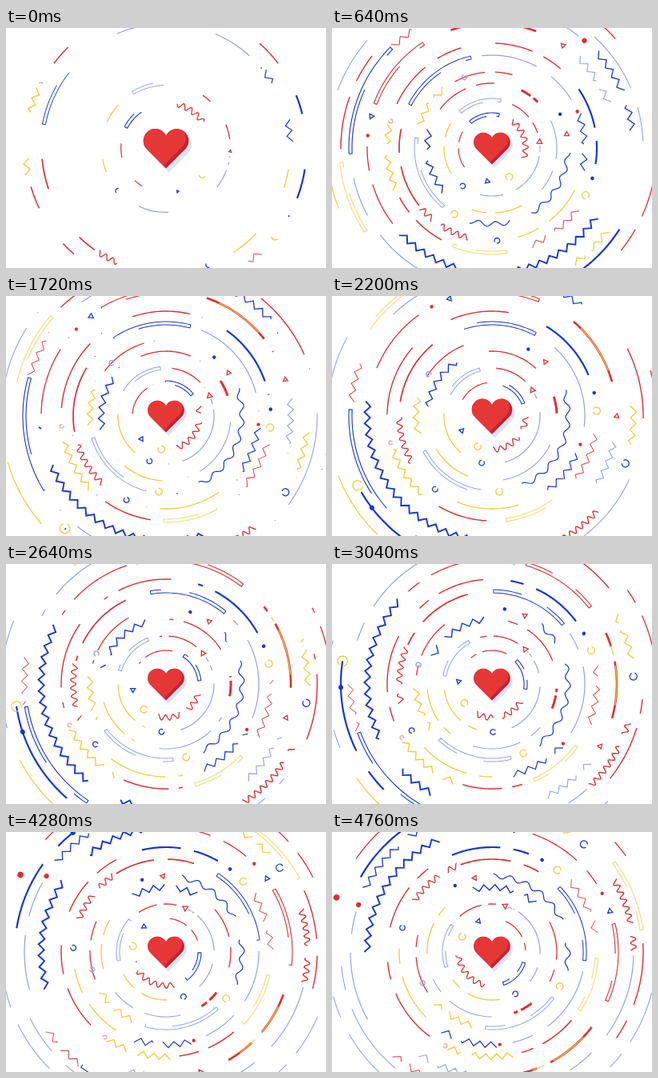
An HTML page with a canvas that plays this animation: 400 by 300 pixels, repeating every 4800 ms.

```html
<!DOCTYPE html>
<html lang="en">
<head>
<meta charset="utf-8">
<title>Heart confetti</title>
<style>
  html, body { margin: 0; width: 100%; height: 100%; overflow: hidden; background: #fff; }
  canvas { display: block; width: 400px; height: 300px; }
</style>
</head>
<body>
<canvas id="stage"></canvas>
<script>
const LOOP = 4800;
const RED = '#dc2f33', BLUE = '#1637d4', SKY = '#8fa1ee', GOLD = '#f3c93b', PINK = '#f0a3a5', CREAM = '#f6dc80';
const rad = d => d * Math.PI / 180;
const mod1 = x => x - Math.floor(x);
const clamp = x => Math.max(0, Math.min(1, x));

const canvas = document.getElementById('stage');
const ctx = canvas.getContext('2d');
const dpr = window.devicePixelRatio || 1;
canvas.width = 400 * dpr;
canvas.height = 300 * dpr;

const rings = [];
// r: radius, speed: degrees per second, late: hidden at the start of the loop
function ring(r, speed, late, paths, marks) {
  rings.push({ r, speed, late, paths, marks });
}

// paths: [kind, colour, from, to, width, gap phase]; marks: [kind, colour, angle, size]
ring(42, 36, false, [
  ['box', BLUE, -153, -101, 1.1],
  ['squiggle', RED, -78, 9, 1.3, .31],
  ['arc', RED, 122, 186, 1.2]
], [['tri', BLUE, 75, 3.4], ['ring', GOLD, 36, 4.3]]);

ring(60, -16.2, false, [
  ['box', SKY, -121, -69, 1],
  ['arc', GOLD, 158, 222, 1.3],
  ['arc', RED, -55, -8, 1.3],
  ['arc', SKY, 20, 115, 1.2],
  ['arc', SKY, 7, 15, 1.2]
], [['tri', RED, 3, 3.8], ['ring', BLUE, 138, 3.3]]);

ring(81, 28, true, [
  ['arc', RED, -81, -63, 3],
  ['arc', RED, -161, -106, 1.3],
  ['arc', GOLD, 45, 90, 1.3],
  ['arc', SKY, -43, 22, 1.1],
  ['zig', BLUE, 120, 178, 1.4]
], []);

ring(95, -22.5, true, [
  ['box', SKY, 144, 202, 1],
  ['wave', BLUE, 18, 121, 1.2],
  ['zig', GOLD, 212, 245, 1.3],
  ['arc', RED, 255, 300, 1.3]
], [
  ['tri', RED, 4, 3.4], ['dot', BLUE, -12, 2.2],
  ['ring', GOLD, 134, 4.3], ['ring', SKY, 263, 3]
]);

ring(116, 26.3, false, [
  ['box', BLUE, 191, 240, 1],
  ['arc', RED, 125, 175, 1.7],
  ['arc', SKY, 247, 312, 1.2],
  ['arc', GOLD, 10, 57, 1.3],
  ['zig', BLUE, -38, -3, 1.2],
  ['squiggle', RED, 88, 123, 1.3]
], [['dot', RED, -40, 2.2], ['ring', BLUE, 70, 3.3]]);

ring(131, -19, false, [
  ['arc', BLUE, -22, 21, 2.2],
  ['arc', RED, -76, -37, 1.4],
  ['arc', RED, 217, 265, 1.4],
  ['arc', RED, 131, 164, 1.5],
  ['box', CREAM, 94, 124, 1.2],
  ['zig', GOLD, 169, 205, 1.4],
  ['zig', RED, 48, 80, .9]
], [['dot', BLUE, 29, 2.3], ['ring', GOLD, 39, 4.5], ['ring', PINK, 207, 2.4]]);

ring(156, 35.5, true, [
  ['box', RED, 178, 214, 1.1],
  ['arc', RED, -132, -92, 2.6],
  ['zig', BLUE, 11, 114, 1.9],
  ['zig', SKY, -69, -44, 1.1],
  ['arc', RED, 120, 158, 1.3],
  ['arc', GOLD, 234, 262, 1.2]
], [['tri', BLUE, 172, 3.6], ['tri', RED, -78, 3.4], ['dot', RED, 163, 2.2]]);

ring(177, -27, true, [
  ['box', BLUE, 195, 242, 1.1],
  ['zig', BLUE, -25, 10, 1.3],
  ['squiggle', RED, 98, 128, 1.4],
  ['zig', GOLD, 53, 72, 1.3],
  ['zig', RED, 243, 262, .9],
  ['arc', SKY, 130, 185, 1.2],
  ['arc', SKY, 280, 325, 1.2]
], [['dot', RED, 328, 3.1], ['ring', BLUE, 79, 4.5]]);

ring(189, 43, true, [
  ['arc', BLUE, 5, 58, 2.2],
  ['box', CREAM, 119, 147, 1.2],
  ['arc', RED, 152, 190, 1.4],
  ['arc', RED, 235, 268, 1.4],
  ['arc', SKY, 285, 330, 1.1]
], [['ring', GOLD, 58, 6.2], ['dot', BLUE, 48, 3]]);

ring(206, -18, true, [
  ['arc', RED, 20, 50, 1.3],
  ['arc', SKY, 100, 130, 1.1],
  ['arc', GOLD, 170, 200, 1.2],
  ['arc', SKY, 212, 250, 1.1],
  ['arc', RED, 300, 330, 1.3]
], [['dot', RED, 285, 3.8]]);

// each kind gives its step count and a radial offset along the path
const kinds = {
  arc: len => [Math.ceil(len / 3), () => 0],
  zig: len => {
    const n = Math.max(3, Math.round(len / 7));
    return [n, u => {
      const k = Math.floor(u * n), f = u * n - k, sign = k % 2 ? -1 : 1;
      return 3.6 * sign * (1 - 2 * f);
    }];
  },
  squiggle: len => {
    const n = Math.max(3, Math.round(len / 5));
    return [n * 6, u => 3.4 * Math.cos(u * n * Math.PI)];
  },
  wave: len => {
    const n = Math.round(len / 11);
    return [n * 6, u => 3 * Math.cos(u * n * Math.PI)];
  }
};

function shapeOf(kind, r, from, to) {
  const span = to - from;
  const at = (u, off) => {
    const a = rad(from + span * u);
    return [(r + off) * Math.cos(a), (r + off) * Math.sin(a)];
  };
  if (kind === 'box') {
    // along the outer edge, across, and back along the inner edge
    return [50, u => {
      if (u <= .48) return at(u / .48, 2);
      if (u <= .5) return at(1, 2 - (u - .48) * 200);
      if (u <= .98) return at(1 - (u - .5) / .48, -2);
      return at(0, -2 + (u - .98) * 200);
    }];
  }
  const [n, off] = kinds[kind](r * rad(span));
  return [n, u => at(u, off(u))];
}

function strokePart(n, point, u0, u1) {
  if (u1 - u0 < .002) return;
  ctx.beginPath();
  ctx.moveTo(...point(u0));
  for (let k = Math.floor(u0 * n) + 1; k / n < u1; k++) ctx.lineTo(...point(k / n));
  ctx.lineTo(...point(u1));
  ctx.stroke();
}

function drawPath([kind, color, from, to, width, phase = 0], r, gap, t) {
  if (gap >= 1) return;
  const [n, point] = shapeOf(kind, r, from, to);
  const start = mod1(.45 + phase + .265 * t + gap / 2);
  const end = start + 1 - gap;
  ctx.strokeStyle = color;
  ctx.lineWidth = width;
  strokePart(n, point, start, Math.min(1, end));
  if (end > 1) strokePart(n, point, 0, end - 1);
}

function drawMark([kind, color, angle, size], r, grow, t) {
  if (grow <= 0) return;
  ctx.save();
  ctx.rotate(rad(angle));
  ctx.translate(r, 0);
  ctx.strokeStyle = ctx.fillStyle = color;
  ctx.lineWidth = 1.3;
  ctx.beginPath();
  if (kind === 'dot') {
    ctx.arc(0, 0, size * grow, 0, 7);
    ctx.fill();
  } else if (kind === 'ring') {
    const a = t * 1.7;
    ctx.arc(0, 0, size, a, a + 5.4 * grow);
    ctx.stroke();
  } else {
    for (let i = 0; i < 3; i++) {
      const a = rad(120 * i + 40);
      ctx.lineTo(size * grow * Math.cos(a), size * grow * Math.sin(a));
    }
    ctx.closePath();
    ctx.stroke();
  }
  ctx.restore();
}

const heart = new Path2D();
heart.moveTo(0, 20.5);
heart.arc(-10.8, -7.3, 12, rad(135), rad(334.3));
heart.arc(10.8, -7.3, 12, rad(205.7), rad(405));
heart.closePath();

function fillHeart(x, y, color) {
  ctx.save();
  ctx.translate(x, y);
  ctx.fillStyle = color;
  ctx.fill(heart);
  ctx.restore();
}

function drawHeart(scale) {
  ctx.save();
  ctx.scale(scale, scale);
  fillHeart(3, 4, '#dde2fb');
  fillHeart(0, 0, '#c9202a');
  ctx.clip(heart);
  fillHeart(-2.8, -2.4, '#e63737');
  ctx.restore();
}

function draw(t) {
  const settle = Math.pow(1 - clamp(t / .6), 3);
  const beat = Math.sin(Math.PI * clamp((t - 2) / .45));
  ctx.setTransform(dpr, 0, 0, dpr, 0, 0);
  ctx.fillStyle = '#fff';
  ctx.fillRect(0, 0, 400, 300);
  ctx.translate(200, 150);
  ctx.lineJoin = 'miter';

  for (const { r, speed, late, paths, marks } of rings) {
    const gap = .17 + (late ? .83 : .36) * settle;
    const grow = 1 - (late ? 1 : .55) * settle;
    ctx.save();
    ctx.rotate(rad(speed * t));
    const radius = r * (1 + .34 * settle);
    for (const p of paths) drawPath(p, radius, gap, t);
    for (const m of marks) drawMark(m, radius, grow, t);
    ctx.restore();
  }
  drawHeart(1 + .24 * settle + .11 * beat);
}

const began = performance.now();
function tick() {
  const ms = (performance.now() - began) % LOOP;
  draw(Math.floor(ms / 40) * .04);
  requestAnimationFrame(tick);
}
tick();
</script>
</body>
</html>
```
